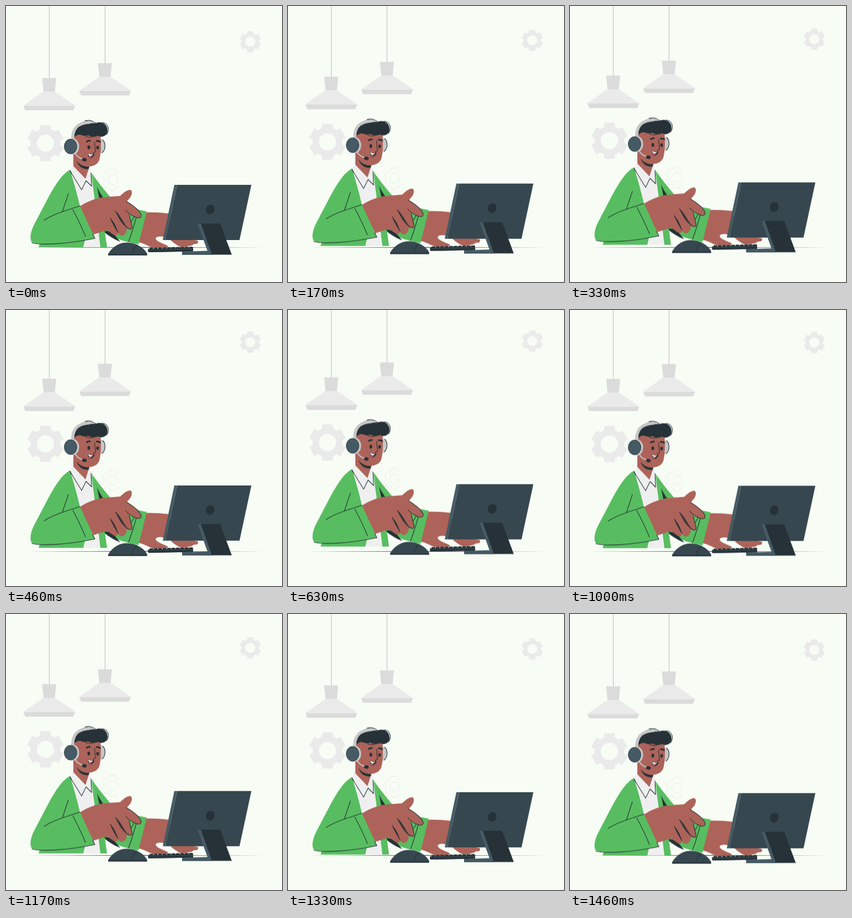
These frames come from a looping animation (500 by 500 pixels, 1500 ms). An HTML page:

```html
<!DOCTYPE html>
<html lang="en">
<head>
<meta charset="utf-8">
<title>Support agent</title>
<style>
  html, body { margin: 0; width: 100%; height: 100%; overflow: hidden; background: #f7fcf5; }
  svg { display: block; width: 100%; height: 100%; }
  .float { animation: float 1.5s linear -40ms infinite; }
  @keyframes float {
    0%, 100% { transform: translateY(.5px); }
    50% { transform: translateY(-9.5px); }
  }
  .pale { fill: #eaeaea; }
  .grey { fill: #dbdbdb; }
  .skin { fill: #ad6359; }
  .green { fill: #58bd60; }
  .shirt { fill: #efefef; }
  .dark { fill: #263238; }
  .slate { fill: #37474f; }
  .steel { fill: #455a64; }
  .band { fill: #c7c7c7; }
  .ink { fill: none; stroke: #263238; stroke-width: 1.1; stroke-linecap: round; stroke-linejoin: round; }
  .gear { fill-rule: evenodd; }
</style>
</head>
<body>
<svg viewBox="0 0 500 500">
  <defs>
    <path id="gear" class="gear"/>
    <g id="lamp">
      <path d="M78.5-140V131" stroke="#bdbdbd"/>
      <path class="grey" d="M65.5 130.5H91L88.5 155H68zM31.5 180.5H125.5L122 189H35z"/>
      <path class="pale" d="M68 155H88.5L125.5 180.5H31.5z"/>
    </g>
    <clipPath id="part"><path d="M170 290H204V340H170z"/></clipPath>
  </defs>

  <path class="dark" d="M36 437.2L250 436.7 467 437.2 250 437.7z"/>

  <g class="float">
    <use href="#lamp"/>
    <use href="#lamp" x="101" y="-27"/>
    <use href="#gear" class="pale" transform="translate(71.5 248.5)"/>
    <use href="#gear" class="pale" transform="translate(442.5 64.5) scale(.585)"/>
    <g clip-path="url(#part)">
      <use href="#gear" fill="none" stroke="#e6e9e5" stroke-width="1.3" transform="translate(193.5 314.5) scale(.585)"/>
    </g>

    <!-- far arm -->
    <path class="skin" d="M248 374Q272 373 296 376L300 418 347 425C350 429 346 432 341 431L336 434 326 436 318 437C310 434 303 429 296 422 288 418 274 415 271 421 272 427 285 430 292 434 296 437 290 438 284 438H266C256 434 248 429 236 427z"/>
    <path class="green" d="M154 301C163 314 176 331 188 345L240 369 255 372 240 432 222 428C205 424 190 417 178 408L163 345z"/>
    <path class="dark" d="M165 328C168 335 172 341 176 347L169 348zM178 407L192 409 207 427C196 423 186 416 178 410z"/>
    <path class="ink" d="M238 375Q231 403 222 427M236 376L219 403"/>

    <!-- torso -->
    <path class="shirt" d="M120 290L151 291 155 303 165 345 172 437H139L132 362z"/>
    <path class="green" d="M154 301L163 335 169 349 179 408 183 437H171L160 345z"/>
    <path class="green" d="M116 297Q126 328 134 363L143 424 140 437H59L62 428 52 405 90 330Q102 304 116 297z"/>

    <!-- neck and collar -->
    <path class="skin" d="M122 268V290L144 313 152 288 150 275z"/>
    <path class="shirt" d="M121 289L116 298 137 333 145 316zM152 292L145 316 155 326 155 302z"/>
    <path class="ink" d="M115.500 298L137 333 145 316.500 155 326.500 154 302"/>

    <!-- head -->
    <ellipse class="band" cx="172.500" cy="254" rx="7" ry="12.500"/>
    <path class="ink" d="M175 242.500C181 247 181 261 174 266"/>
    <path class="skin" d="M122 228H171C172 246 173 266 169 279 166 288 155 292 146 290.500 136 289 128 281 122 272z"/>
    <path class="dark" d="M128 280C133 288 141 291.500 150.500 291L150 295C140 297 131 291 128 280z"/>
    <path class="dark" d="M124 237C123 223 130 212 142 209 151 206 159 208 163 212 174 208 185 215 184 227 182 236 174 239 167 235 160 238 153 237 149 234 143 237 138 234 134 233Q129 233 124 237z"/>
    <path class="ink" stroke-width=".8" d="M143 208Q153 205 160 211M174 211C185 212 189 224 182 233M144 236Q153 240 159 236"/>
    <path d="M121 246C119 223 128 212 152 210.500" fill="none" stroke="#c7c7c7" stroke-width="5.500"/>
    <path class="band" d="M150 207.700Q158 208 162 212.500 157 212 150 213.300z"/>

    <!-- face -->
    <path d="M146.500 245.500Q149 243.500 152 244M164.500 244.500Q168 244 170.500 246" fill="none" stroke="#263238" stroke-width="3" stroke-linecap="round"/>
    <ellipse class="dark" cx="150" cy="256" rx="2.500" ry="3.500"/>
    <ellipse class="dark" cx="166" cy="256.500" rx="2.400" ry="3.300"/>
    <path class="ink" stroke-width="1.300" d="M160.500 246Q161 255 162.300 264L158.500 266V269"/>
    <path class="dark" d="M149 266.500Q154 270 161 268.500 158 275 151 276 148 272 149 266.500z"/>
    <path fill="#fff" d="M149.500 267Q153 270 158 269.500L154 272 149.500 270z"/>
    <path fill="#d9677a" d="M149.500 271.500Q153 270 154.500 273.500L151 275.500z"/>

    <!-- headset -->
    <ellipse class="band" cx="121.500" cy="254.500" rx="11" ry="14.500"/>
    <ellipse class="steel" cx="117" cy="254.500" rx="11.500" ry="13.500" stroke="#263238" stroke-width=".8"/>
    <path d="M125.500 267Q130 275 139 277" fill="none" stroke="#c7c7c7" stroke-width="2"/>
    <ellipse class="dark" cx="142" cy="278.300" rx="4.300" ry="3" transform="rotate(12 142 278)"/>

    <!-- near arm and hand -->
    <path class="skin" d="M132 364C147 354 164 347 182 346L207 344C213 338 219 333 225 333 230 335 228 342 225 347L219 354C230 361 242 370 245 380 244 386 238 385 233 382L222 376C224 385 227 392 229 400 229 406 224 405 219 402 219 411 214 417 209 416 206 416 204 413 203 411 203 416 197 417 193 413L183 406 158 414z"/>
    <path class="ink" d="M218 354C230 361 242 370 245 379 245 386 237 384 231 381Q223 377 217 370M198 372C206 378 211 390 218 400 224 406 230 405 228 398L223 378M189 384C193 394 197 400 203 410"/>
    <path class="dark" d="M198 372C207 382 212 393 219 402 211 396 204 385 198 372zM189 384Q199 395 203 411 196 401 189 384z"/>
    <path class="green" d="M116 297C101 304 88 326 74 352L52 394C43 411 43 424 47 428 61 434 110 431 161 421L134 362 113 368z"/>
    <path class="ink" d="M47 429C63 434 112 431 161 421L157 413M69 388C89 375 112 370 134 362M113 340L102 373M121 369Q132 389 144 417"/>
    <path class="ink" d="M116 298L119 304"/>

    <!-- desk items -->
    <path class="slate" d="M257 440L339 437V444.500L258 446z"/>
    <path class="dark" d="M257 442.500L339 441V444.500L258 446z"/>
    <path d="M260 439.500L338 437.500" stroke="#263238" stroke-width="3" stroke-dasharray="6.500 1.500"/>
    <path class="slate" d="M185 451.500V449C194 434 207 428.500 219 428.500 235 428.500 249 437 255.500 448V451.500z"/>
    <path class="dark" d="M185 449.500H255.500V451.800H185z"/>
    <path class="ink" d="M228.500 448Q230 438 238 433.500"/>
    <path class="slate" d="M310 324H444.500L423 424H289z"/>
    <path class="steel" d="M305 324H310L289 424H284z"/>
    <ellipse class="dark" cx="370" cy="368.500" rx="7.800" ry="8.800" transform="rotate(25 370 368.500)"/>
    <path class="steel" d="M347 394H354L374 450.500H319V445L365 443.500z"/>
    <path class="slate" d="M319 449H373V450.500H319z"/>
    <path class="dark" d="M353 394H388L409 450.500H373z"/>
  </g>
</svg>
<script>
  // Six-toothed cog of radius 33 with a round hole.
  const at = (deg, r) => {
    const a = deg * Math.PI / 180;
    return `${(r * Math.sin(a)).toFixed(2)} ${(-r * Math.cos(a)).toFixed(2)}`;
  };
  let d = "";
  for (let a = 0; a < 360; a += 60) {
    d += `${a ? "A27 27 0 0 1 " : "M"}${at(a - 22, 27)}L${at(a - 16, 34)}L${at(a + 16, 34)}L${at(a + 22, 27)}`;
  }
  d += `A27 27 0 0 1 ${at(-22, 27)}ZM15.5 0A15.5 15.5 0 1 0-15.5 0A15.5 15.5 0 1 0 15.5 0Z`;
  document.getElementById("gear").setAttribute("d", d);
</script>
</body>
</html>
```
